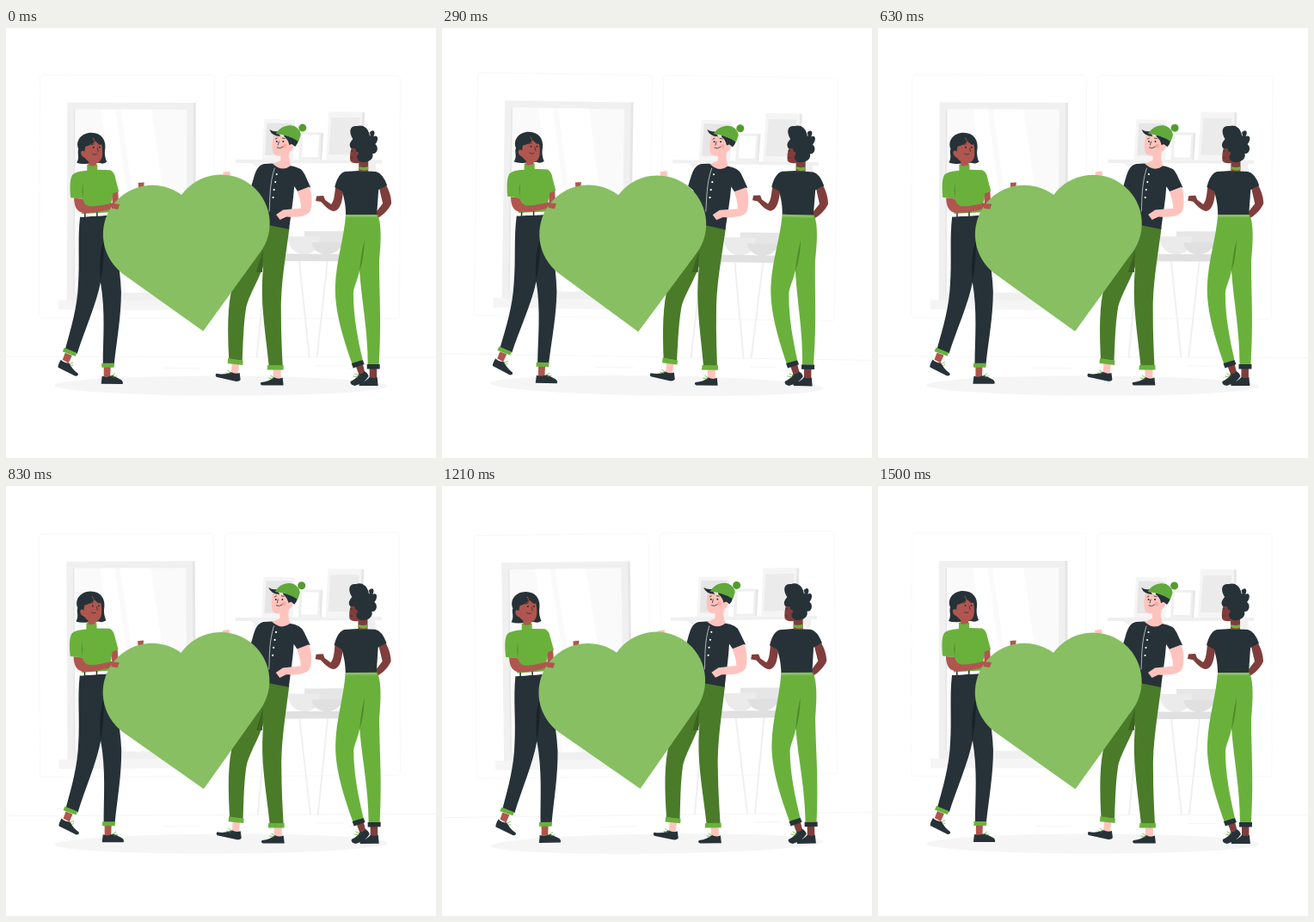
These frames come from a looping animation (500x500 px, 1.54 s). An HTML page:

```html
<!DOCTYPE html>
<html lang="en">
<head>
<meta charset="utf-8">
<title>Carrying a heart</title>
<style>
  html, body { margin: 0; width: 100%; height: 100%; overflow: hidden; background: #fff; }
  svg { display: block; width: 100vw; height: 100vh; }
  .sway { transform-box: fill-box; transform-origin: center; transform: rotate(var(--tilt)); }
  .dark { fill: #263238; }
  .green { fill: #6ab13c; }
  .moss { fill: #4a7b29; }
  .tan { fill: #b0564e; }
  .pink { fill: #ffc3bd; }
  .brown { fill: #7f3e3b; }
  .g0 { fill: #fafafa; }
  .g1 { fill: #f0f0f0; }
  .g2 { fill: #e6e6e6; }
  .g3 { fill: #e0e0e0; }
  .pale { fill: #f5f5f5; }
  .white { fill: #fff; }
  .line { fill: none; stroke-width: .8; stroke-linecap: round; }
</style>
</head>
<body>
<svg viewBox="0 0 500 500">
  <g id="room" class="sway">
    <g class="line" stroke="#f7f7f7">
      <rect x="39" y="55" width="203" height="282.500" rx="4"/>
      <rect x="255" y="55" width="203" height="282.500" rx="4"/>
      <path stroke="#f3f3f3" d="M0 382.500H500M183 395.500H225M361 392.500H392M398 396H410"/>
    </g>

    <path class="g1" d="M71 87H218V318H71Z"/>
    <path class="g2" d="M217.500 87H220.500V318H217.500ZM78.500 95H80.500V308H78.500Z"/>
    <path class="g0" d="M80 95H210V308H80Z"/>
    <path class="white" d="M110 95H127L157 308H140ZM133 95H169L199 308H163Z"/>
    <path class="pale" d="M61 317H229V328H61Z"/>

    <path class="g1" d="M267 153H437V157H267ZM285 157H297L292 162ZM420 157H430V167H423Z"/>
    <path class="pale" d="M300 106L336 106.500L334 153H297.500ZM375 97H414L412 153H372Z"/>
    <path class="g2" d="M303 110.500L333 111L330 148H301Z"/>
    <path class="g1" d="M342 121H366L365 153H340Z"/>
    <path class="g2" d="M366 121L369 122L367 153H365ZM414 97L417 98L415 153H412Z"/>
    <path class="white" d="M345 124H364L362.500 150H343.500Z"/>
    <path fill="#ebebeb" d="M378 104H411L409 147H375Z"/>

    <path class="line" stroke="#f0f0f0" style="stroke-width:2" d="M303 270L292 382M341 270L353 382M374 270L362 382"/>
    <path class="g2" d="M347 236H393V256H347Z"/>
    <path fill="#ebebeb" d="M327 242H365Q364 262 347 263Q330 262 327 242Z"/>
    <path class="g3" d="M355 249H391Q388 262 373 263Q358 262 355 249ZM298 262.500H396V271H298Z"/>
  </g>

  <ellipse class="sway pale" cx="250" cy="416" rx="193.500" ry="11.500"/>

  <g id="right-woman" class="sway">
    <path class="brown" d="M407 393L415 390L418 402L411 404ZM423 395H431.500V408H423Z"/>
    <path class="dark" d="M401 411Q408 408 411 402Q415 403 417 399Q421 401 422 405Q417 413 406 416Q400 415 401 411ZM411 413Q419 411 423 406Q428 408 432 406L433 416H411Z"/>
    <path class="line" stroke="#6ab13c" d="M411 404L406 402M409 406L404 405"/>
    <path class="brown" d="M383 184L392 189C391 201 389 212 381 213C375 212 370 206 366 202L360 201L361 195.500L369 195L371 200L378 205C382 200 382 192 383 184Z"/>
    <path class="brown" d="M442 183C446 190 448 198 448 204C445 211 438 218 432 221L429.500 215L438 204L434 187Z"/>
    <path class="green" d="M395 217L432 217C437 229 436 249 434 270C434 310 437 340 434 391H421C421 352 414 320 411 282C409 294 405 299 404 308C404 337 410 364 415 386L403 391C393 363 382 329 383 300C384 270 393 245 395 217Z"/>
    <path d="M417 246Q413 261 411 283Q416 270 417 246Z" fill="#4e8a29"/>
    <path class="dark" d="M402 390L415 386L417 391L404 395.500ZM420 391H435V396.500H420Z"/>
    <path class="dark" d="M410 166L430 167Q438 169 443 183L433 188L431 218L395 217C395 203 392 196 391 190L382 185Q386 169 394 167Z"/>
    <path fill="#87bf62" d="M395 217H431V220H395Z"/>
    <path class="brown" d="M402 138Q399 146 400 154Q402 158 410 157L410 167H421V152L412 138Z"/>
    <path class="green" d="M410 161Q416 163 421 161V165Q415 167 410 164Z"/>
    <path class="dark" d="M401 140C397 135 402 131 403 129C398 121 399 113 408 114C414 112 420 115 422 122C427 116 430 121 427 126C433 123 433 131 429 135C434 139 431 147 426 146C428 153 420 157 413 156Q407 154 408 148L406 140Z"/>
    <circle class="brown" cx="407.500" cy="146" r="2.200"/>
    <path class="line" stroke="#fff" d="M416 114Q422 117 423 125"/>
    <path class="line" stroke="#263238" d="M401 143L403 143M401 151L403 151"/>
  </g>

  <g id="man" class="sway">
    <path class="pink" d="M263 390H271.500L270 403H262ZM311 396H320V409H311ZM252 168L260 166.500L261 174H253Z"/>
    <path class="dark" d="M245 402Q254 404 262 400Q267 403 272 401L273 409Q272 411 268 411L245 406Q243 404 245 402ZM297 412Q307 411 312 406Q317 409 322 406.500L323 415.500H298Q295 414 297 412Z"/>
    <path class="line" stroke="#6ab13c" d="M262 401L258 398M260 402L256 401M312 407L308 404M310 408L306 407"/>
    <path class="moss" d="M295 245L307 230L304 262C297 290 282 310 279 327C276 348 276 366 275 387L259.500 385C258 354 257 323 264 298Z"/>
    <path d="M299 258L298 284Q294 284 291 284Z" fill="#3b6321"/>
    <path class="moss" d="M305 228L329.500 232C325 268 319 300 320 333C320 354 321 372 322 393H306C303 362 297 328 298 297C299 272 302 249 305 228Z"/>
    <path class="green" d="M258.500 384L276 387L275.500 392L258 390ZM304.500 392H323V397.500H304Z"/>
    <path class="dark" d="M309 157.500L330 160Q344 162 347 170L354 185L339 190L335 184C334 201 331 218 329 234L304 229L291 189L285 184C289 172 290 160 300 158Z"/>
    <path class="pink" d="M338.500 190L352.500 184.500C356 194 356 204 354 212C350 220 336 220 326 219.500L318.500 223L314 217L322 211.500L343 209.500C343 203 341 196 338.500 190Z"/>
    <path class="pink" d="M319 145L329 141Q328 153 331 160Q321 168 310 158L319 154Z"/>
    <path class="line" stroke="#fff" d="M312 163C306 182 307 198 306 213" opacity=".8"/>
    <g class="white">
      <circle cx="314.500" cy="170" r="1.100"/><circle cx="313" cy="179" r="1.100"/>
      <circle cx="311.500" cy="188" r="1.100"/><circle cx="310.500" cy="197" r="1.100"/>
    </g>
    <path class="pink" d="M311 125C309 132 308 143 312 147Q320 151 328 145L332 139L330 127Z"/>
    <path class="dark" d="M306 118Q311 121 315 120L319 126Q309 126 306 118ZM323 124L340 130Q339 135 336 138L332 135L329 136Q328 130 323 126Z"/>
    <path class="pink" d="M328 138Q333 133 334 138Q333 143 328 144Z"/>
    <path fill="#61a93a" d="M313.500 123C318 115 327 111.500 335 114Q342 118 342.500 124L340 132Q328 124 313.500 123Z"/>
    <circle cx="344.500" cy="116" r="4.500" fill="#559a2e"/>
    <path class="line" stroke="#263238" d="M313 129L315 128M321 128L324 128.500M315 139Q318 141 322 138M317 132L316 136"/>
    <circle class="dark" cx="314.500" cy="132" r="1"/>
    <circle class="dark" cx="322" cy="132" r="1"/>
    <circle cx="324" cy="137" r="2.300" fill="#ff9a92" opacity=".7"/>
  </g>

  <g id="left-woman" class="sway">
    <path class="tan" d="M69 378L77 381L73 390L66 386ZM114 394H122L121.500 406H114ZM153.500 180L160.500 179.500L160 186H154Z"/>
    <path class="dark" d="M64 386Q68 390 74 390Q77 397 84 402Q85 405 81 405Q71 400 61 395Q60 393 64 386ZM112 405Q118 407 124 404L134 409Q137 411 136 414H111Z"/>
    <path class="line" stroke="#6ab13c" d="M74 391L78 389M76 393L78 392M123 405L127 402M125 406L129 405"/>
    <path class="dark" d="M86 220L120 218C125 245 133 275 134 307C134 336 129 363 126 391H113C113 362 116 330 110 296C105 322 91 353 83 379L69 374C76 349 83 325 84 299C86 272 83 245 86 220Z"/>
    <path d="M114 246C110 258 108 272 110 295C113 280 114 263 114 246Z" fill="#192327"/>
    <path class="green" d="M68 372L82.500 378L81 382L66 376.500ZM111.500 390H126.500L126 395H111.500Z"/>
    <path class="tan" d="M122 186L130 188L131 206L124 207Z"/>
    <path class="green" d="M94 159Q100 157 106 159V165L121 165.500Q126 168 127 175L131 190L124 192.500C123 201 121 208 121 216L88 217L89 199L75 197.500C74 184 74 176 77 171Q80 167 94 166Z"/>
    <path d="M89 180Q87.500 190 89 199Q90.500 190 89 180Z" fill="#559130"/>
    <path class="tan" d="M79 198C79 207 82 214 89 215C102 216 114 213 124 210L124 203.500C113 206 101 209 95 207C91 205 90 202 89 199Z"/>
    <path class="white" d="M87 216.500L120 214.500V218L87 220Z"/>
    <path class="dark" d="M91 215.500H92.500V221H91ZM105 214.500H106.500V220H105Z"/>
    <path class="dark" d="M82 157C86 150 82 146 84 141C80 132 87 122 99 122C111 122 116 131 115 140C114 147 115 151 117 156Q113 159 108 157L95 158Q87 159 82 157Z"/>
    <path class="tan" d="M91 144C86 140 85 149 91 151L96 156V160Q101 162 105 159V157C112 156 113 147 111 136Q106 135 104 132Q98 137 92 138Z"/>
    <path class="line" stroke="#b0564e" d="M101 128Q103 131 103 134"/>
    <path class="line" stroke="#263238" d="M99 136L102 135M107 135L109 135.500M100 146.500Q102 148.500 105 147M106 140L107 144"/>
    <circle class="dark" cx="101.500" cy="139" r="1"/>
    <circle class="dark" cx="108.500" cy="139" r="1"/>
    <path id="heart" fill="#87bf62" d="M204 194A56.500 56.500 0 0 0 136 286L229.500 352.500L296 260A56.500 56.500 0 0 0 204 194Z"/>
    <path class="tan" d="M122 204L132 205L130 211L123 210Z"/>
  </g>
</svg>
<script>
  const PERIOD = 1540, LEAD = 50;

  // Triangle wave between -1 and 1 degree; each group turns about its own centre.
  function draw(now) {
    const phase = 2 * Math.PI * (now + LEAD) / PERIOD;
    const angle = Math.asin(Math.sin(phase)) * 2 / Math.PI;
    document.documentElement.style.setProperty('--tilt', `${angle.toFixed(3)}deg`);
    requestAnimationFrame(draw);
  }
  draw(performance.now());
</script>
</body>
</html>
```
